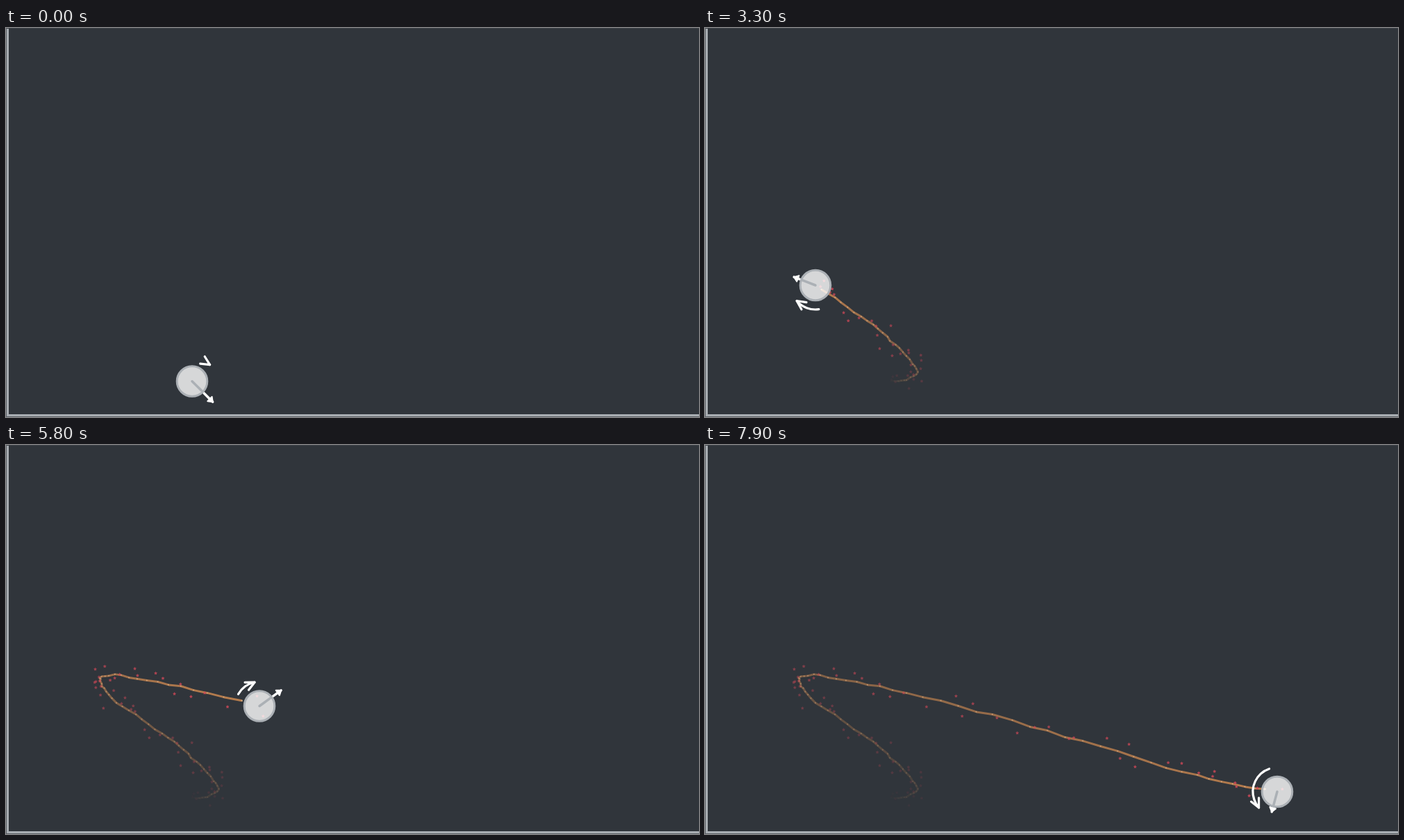
Recreate the animation shown at these times as an HTML page with a canvas. Size 998 by 561 pixels, loop 8 s.

```html
<!DOCTYPE html>
<html>
<head>
<meta charset="utf-8">
<style>
html, body { margin: 0; width: 100%; height: 100%; overflow: hidden; background: #30353b; }
canvas { display: block; }
</style>
</head>
<body>
<canvas id="stage" width="998" height="561"></canvas>
<script>
const ctx = document.getElementById('stage').getContext('2d');
const STEP = 100, STEPS = 80, RAD = Math.PI / 180;
const SWEEP_PER_TURN = 4.8; // arc sweep for one degree of turn per step

// Way points: step, x, y
const path = [
  [0, 268, 509.5], [6, 286, 508], [11, 305.5, 496], [15, 294.5, 478], [24, 242, 428],
  [33, 159, 371], [38, 139, 347], [43, 138, 334.5], [48, 177, 334], [54, 270, 353],
  [58, 365, 376.5], [66, 569, 434.5], [72, 708, 477], [79, 824, 500]
];
// Steering: step, heading, sweep of the turning arrow, reach of the forward arrow
const steering = [
  [0, 45, 4, 43], [15, -97, -57, 31], [33, -159, 58, 34], [43, 20, 114, 33],
  [58, 324, 49, 39.5], [66, 340, -29, 33], [79, 105, -112, 31]
];

// Value and slope at u in [0, 1] of the cubic from a to b over a span of steps
function hermite(a, b, slopeA, slopeB, span, u) {
  const d = (b - a) / span, p = slopeA - d, q = d - slopeB;
  return {
    value: a + (b - a) * u + span * u * (1 - u) * (p * (1 - u) + q * u),
    slope: d + p * (1 - u) * (1 - 3 * u) + q * u * (2 - 3 * u)
  };
}

function segment(keys, step) {
  const k = Math.max(1, keys.findIndex(key => key[0] >= step));
  const span = keys[k][0] - keys[k - 1][0];
  return { k, span, u: (step - keys[k - 1][0]) / span };
}

function position(step) {
  const { k, span, u } = segment(path, step);
  const slope = (i, axis) => {
    const a = path[Math.max(0, i - 1)], b = path[Math.min(path.length - 1, i + 1)];
    return (b[axis] - a[axis]) / (b[0] - a[0]);
  };
  return [1, 2].map(axis => hermite(path[k - 1][axis], path[k][axis],
    slope(k - 1, axis), slope(k, axis), span, u).value);
}

function steer(step) {
  const { k, span, u } = segment(steering, step);
  const [, h0, s0, r0] = steering[k - 1], [, h1, s1, r1] = steering[k];
  const { value, slope } = hermite(h0, h1, s0 / SWEEP_PER_TURN, s1 / SWEEP_PER_TURN, span, u);
  return { angle: value * RAD, sweep: slope * SWEEP_PER_TURN * RAD, reach: r0 + (r1 - r0) * u };
}

let seed = 11;
const random = () => (seed = seed * 16807 % 2147483647) / 2147483647;
const noise = size => (random() + random() + random() - 1.5) * size;
const scatter = size => ([x, y]) => [x + noise(size), y + noise(size)];

const points = Array.from({ length: STEPS }, (_, i) => position(i));
const estimates = points.map(scatter(1.5));
const marks = points.map(scatter(18));

const polar = ([x, y], r, a) => [x + r * Math.cos(a), y + r * Math.sin(a)];

function line(pts, color, width) {
  ctx.beginPath();
  pts.forEach(p => ctx.lineTo(...p));
  ctx.strokeStyle = color;
  ctx.lineWidth = width;
  ctx.stroke();
}

function star(centre) {
  ctx.beginPath();
  for (let i = 0; i < 10; i++) {
    ctx.lineTo(...polar(centre, i % 2 ? 1.4 : 2.6, (i * 36 - 90) * RAD));
  }
  ctx.fill();
}

function drawTrail(n) {
  ctx.lineCap = 'butt';
  for (let i = 1; i < n; i++) {
    ctx.globalAlpha = 0.9 * i / n;
    line([estimates[i - 1], estimates[i]], '#c68550', 3);
    ctx.fillStyle = '#dcb690';
    ctx.fillRect(estimates[i][0] - 1, estimates[i][1] - 1, 2, 2);
  }
  ctx.fillStyle = '#d04858';
  for (let i = 1; i <= n; i++) {
    ctx.globalAlpha = 0.9 * i / n;
    star(marks[i]);
  }
  ctx.globalAlpha = 1;
}

function drawRobot(n) {
  const c = points[n], { angle, sweep, reach } = steer(n);
  const dir = Math.sign(sweep), quarter = Math.PI / 2;
  ctx.lineCap = ctx.lineJoin = 'round';

  // Forward arrow
  const tip = polar(c, reach - 1, angle), base = polar(tip, -6, angle);
  line([polar(c, 24, angle), tip], '#fff', 3.5);
  ctx.beginPath();
  [tip, polar(base, 4.5, angle + quarter), polar(base, 4.5, angle - quarter)]
    .forEach(p => ctx.lineTo(...p));
  ctx.closePath();
  ctx.fillStyle = '#fff';
  ctx.lineWidth = 2;
  ctx.fill();
  ctx.stroke();

  // Body
  ctx.beginPath();
  ctx.arc(...c, 21.8, 0, 7);
  ctx.fillStyle = 'rgba(255,255,255,.8)';
  ctx.fill();
  ctx.strokeStyle = '#abb0b5';
  ctx.lineWidth = 3;
  ctx.stroke();
  line([c, polar(c, 21, angle)], '#abb0b5', 3.5);

  // Turning arrow
  const mid = angle - dir * quarter, end = mid + sweep / 2, r = 35;
  const head = polar(c, r, end), back = end - dir * 105 * RAD;
  ctx.beginPath();
  ctx.arc(...c, r, mid - sweep / 2, end, dir < 0);
  ctx.strokeStyle = '#fff';
  ctx.lineWidth = 3.2;
  ctx.stroke();
  line([polar(head, 14, back - 26 * RAD), head, polar(head, 14, back + 26 * RAD)], '#fff', 3.2);
}

function drawStage() {
  const rect = (color, ...box) => { ctx.fillStyle = color; ctx.fillRect(...box); };
  rect('#30353b', 0, 0, 998, 561);
  rect('#3b4046', 0, 0, 998, 1);
  rect('#5b6066', 0, 0, 1, 561);
  rect('#5b6066', 0, 560, 998, 1);
  rect('#a9aeb3', 1, 1, 3, 559);
  rect('#a9aeb3', 1, 557, 997, 3);
}

const start = performance.now();
function frame(now) {
  const n = Math.floor(Math.max(0, now - start) / STEP) % STEPS;
  drawStage();
  drawTrail(n);
  drawRobot(n);
  requestAnimationFrame(frame);
}
frame(start);
</script>
</body>
</html>
```
